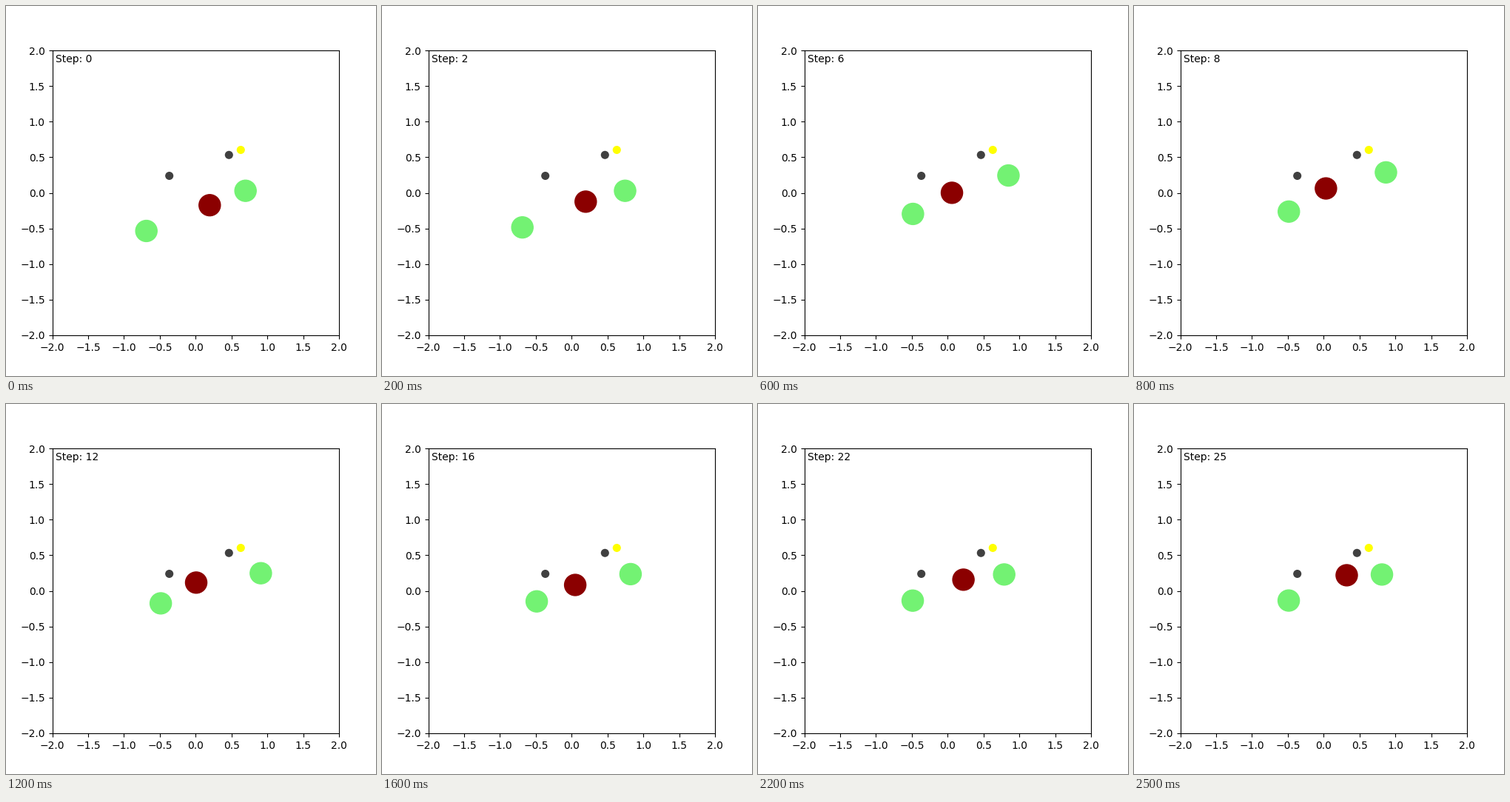
Animation of 500x500 px, one loop 2600 ms. Source, as a matplotlib script:

```python
import matplotlib.pyplot as plt
import numpy as np
from matplotlib.animation import FuncAnimation
from matplotlib.patches import Circle

STEPS = 26
DT, DAMPING, FORCE = 0.1, 0.25, 5.0
PUSH = {".": (0, 0), "U": (0, 1), "D": (0, -1), "L": (-1, 0), "R": (1, 0)}

GREEN = (0.45, 0.95, 0.45)
GREY = (0.25, 0.25, 0.25)

# start position, colour, one push per step
AGENTS = [
    ((-0.687, -0.535), GREEN, ".UURRDLU"),
    ((0.696, 0.029), GREEN, ".RUUDUDUDLRRLLRLRLRLRLRLR"),
    ((0.1966, -0.1735), "darkred", ".ULDUUDUDUDUDUDRUDUDURDUU"),
]
LANDMARKS = [
    ((0.465, 0.532), GREY),
    ((-0.367, 0.239), GREY),
    ((0.630, 0.603), "yellow"),
]


def simulate(start, moves):
    """Damped point mass: positions for every step."""
    pos, vel = np.array(start), np.zeros(2)
    path = [pos]
    for move in moves.ljust(STEPS - 1, "."):
        vel = vel * (1 - DAMPING) + FORCE * DT * np.array(PUSH[move])
        pos = pos + vel * DT
        path.append(pos)
    return path


fig, ax = plt.subplots(figsize=(5, 5), dpi=100)
ax.set_xlim(-2, 2)
ax.set_ylim(-2, 2)

for center, color in LANDMARKS:
    ax.add_patch(Circle(center, 0.05, color=color))

paths = [simulate(start, moves) for start, _, moves in AGENTS]
bodies = [ax.add_patch(Circle(start, 0.15, color=color))
          for start, color, _ in AGENTS]
label = ax.text(-1.95, 1.95, "Step: 0", va="top", fontsize=10)


def update(step):
    for body, path in zip(bodies, paths):
        body.center = path[step]
    label.set_text(f"Step: {step}")
    return [*bodies, label]


anim = FuncAnimation(fig, update, frames=STEPS, interval=100,
                     repeat=True, repeat_delay=0)
plt.show()
```
